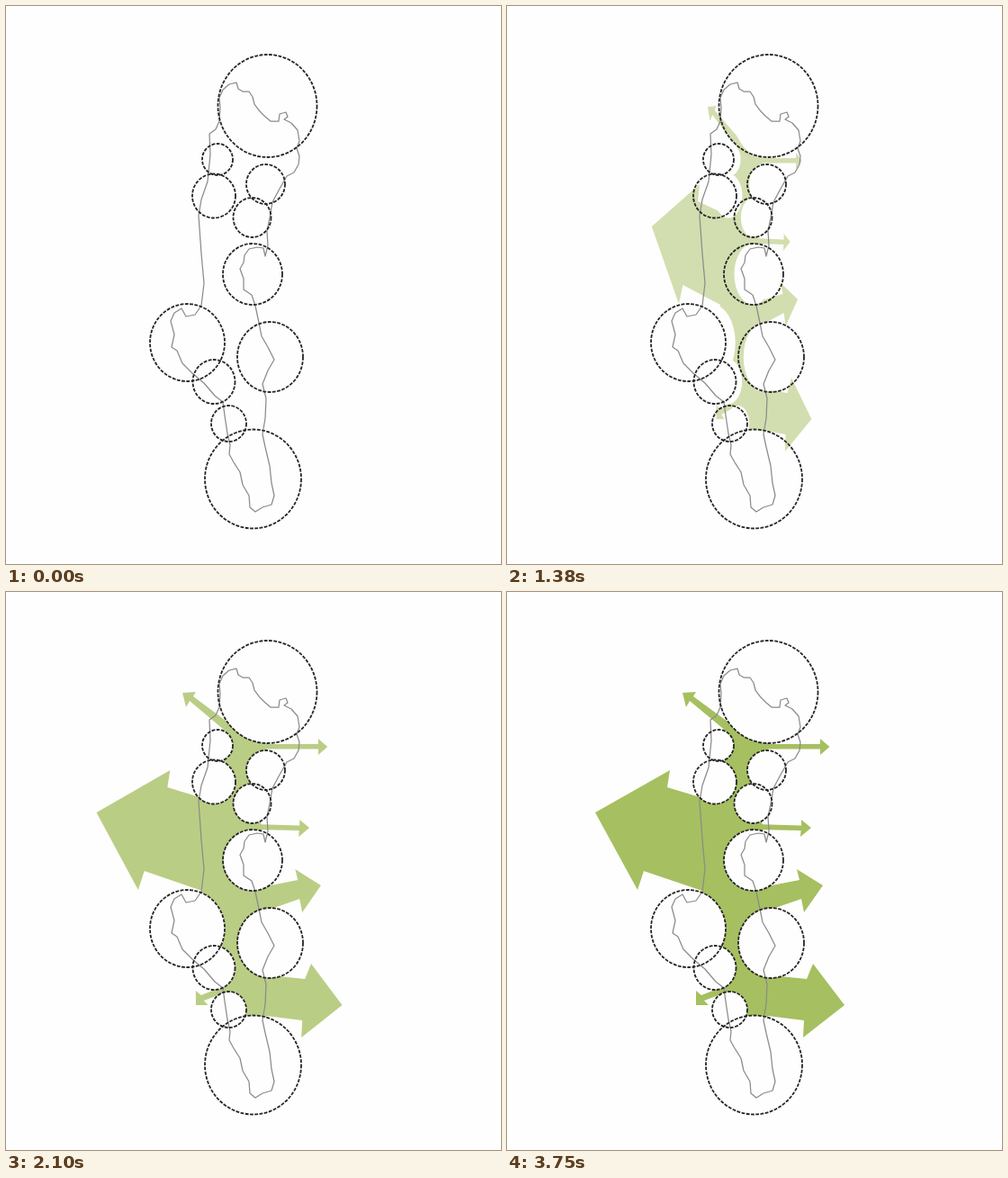
Animation of 550x620 px, one loop 3.99 s. Source, as an HTML page:

```html
<!DOCTYPE html>
<html lang="en">
<head>
<meta charset="utf-8">
<title>Green links</title>
<style>
  html, body { margin: 0; width: 100%; height: 100%; overflow: hidden; background: #fefefe; }
  svg { display: block; width: 550px; height: 620px; }
  #coast path { fill: none; stroke: #8b8b8b; stroke-width: 1.25; stroke-linejoin: round; }
  #rings ellipse { fill: none; stroke: #262626; stroke-width: 1.8; stroke-dasharray: 3.8 1.5; }
</style>
</head>
<body>
<svg viewBox="0 0 550 620">
  <defs>
    <mask id="gaps" maskUnits="userSpaceOnUse" x="0" y="0" width="550" height="620">
      <rect width="550" height="620" fill="#fff"/>
    </mask>
  </defs>
  <g id="green" fill="#a6bf60" opacity="0">
    <g mask="url(#gaps)">
      <!-- spine with the wide arrows -->
      <path d="M246 150 L290 111 L290 172 L288 198 L274 235 L285 261 L274 298 L294 326
        L325 320 L322 308 L351 326 L330 356 L327 341 L298 351 L293 389 L304 427 L333 430
        L340 413 L375 459 L329 495 L330 476 L290 471 L274 525 L247 464 L243 441 L231 417 L201 374
        L217 332 L152 310 L145 331 L98 245 L181 198 L178 217 L231 233 L231 211 L235 170 Z"/>
      <!-- thin arrows -->
      <path d="M195 112 L210 111 L207 116 L256 152 L250 160 L203 121 L199 128 Z"/>
      <path d="M284 169 H348 V163 L358.500 172 L348 181 V174.500 H284 Z"/>
      <path d="M278 258 L327 259.500 V253 L338 262 L326 272 L326.500 265 L278 264 Z"/>
      <path d="M210 443 L216 448 L246 436 V444 L219 454 L224 459 L210 459 Z"/>
    </g>
  </g>
  <g id="coast">
    <path d="M237 128 L238 113 L237 102 L241 93 L248 87 L256 85 L258 92 L263 95 L270 95 L274 101
      L276 109 L282 117 L288 123 L294 128 L303 128 L304 120 L311 118 L313 123 L309 126 L317 130
      L324 138 L326 150 L323 158 L326 167 L325 176 L320 185 L312 189 L304 203 L296 218 L293 235
      L290 250 L291 266 L288 278 L286 269 L279 268 L270 270 L265 277 L264 285 L260 292 L264 303
      L264 315 L273 321 L277 333 L281 352 L284 367 L291 379 L298 393 L291 405 L285 420 L289 436
      L288 458 L285 476 L288 490"/>
    <path d="M288 490 L293 511 L295 530 L298 544 L295 554 L285 557 L277 562 L271 557 L270 544
      L263 532 L260 518 L253 507 L248 498 L249 488 L246 475 L243 455 L241 440 L232 433 L220 419
      L207 408 L196 397 L190 383 L184 379 L187 365 L183 350 L187 341 L195 336 L200 345 L210 343
      L217 333 L220 308 L217 275 L214 233 L217 215 L224 195 L227 165 L226 142 L233 137 L237 128"/>
  </g>
  <g id="rings"></g>
</svg>
<script>
  const LOOP = 3990, STEP = 30, AXIS = 273;

  // cx, cy, rx, ry
  const rings = [
    [290.5, 111, 55, 57], [235, 170.5, 17, 17.5], [231, 211, 24, 24.5],
    [288.5, 198, 21.5, 22], [273.5, 235, 21, 22], [274, 298, 33, 34],
    [201.5, 374, 41.5, 43], [231, 417.5, 23.5, 24.5], [293.5, 390, 36.5, 39],
    [247.5, 464, 19.5, 20], [274.5, 525.5, 53.5, 55]
  ];

  const byId = id => document.getElementById(id);
  const clamp = v => Math.min(1, Math.max(0, v));

  function addEllipse(parent, [cx, cy, rx, ry]) {
    const el = document.createElementNS('http://www.w3.org/2000/svg', 'ellipse');
    Object.entries({ cx, cy, rx, ry }).forEach(([k, v]) => el.setAttribute(k, v));
    parent.append(el);
  }

  for (const r of rings) {
    addEllipse(byId('gaps'), r);
    addEllipse(byId('rings'), r);
  }

  const green = byId('green');
  const start = performance.now();

  // The green shape spreads sideways from its axis while it fades in.
  function draw() {
    const t = Math.floor(((performance.now() - start) % LOOP) / STEP) * STEP;
    const on = t >= 150;
    const sx = clamp((t - 40) / 2090);
    green.setAttribute('transform', `translate(${AXIS} 0) scale(${on ? sx : 0.01} 1) translate(${-AXIS} 0)`);
    green.setAttribute('opacity', on ? clamp((t - 40) / 2700) : 0);
    requestAnimationFrame(draw);
  }
  draw();
</script>
</body>
</html>
```
